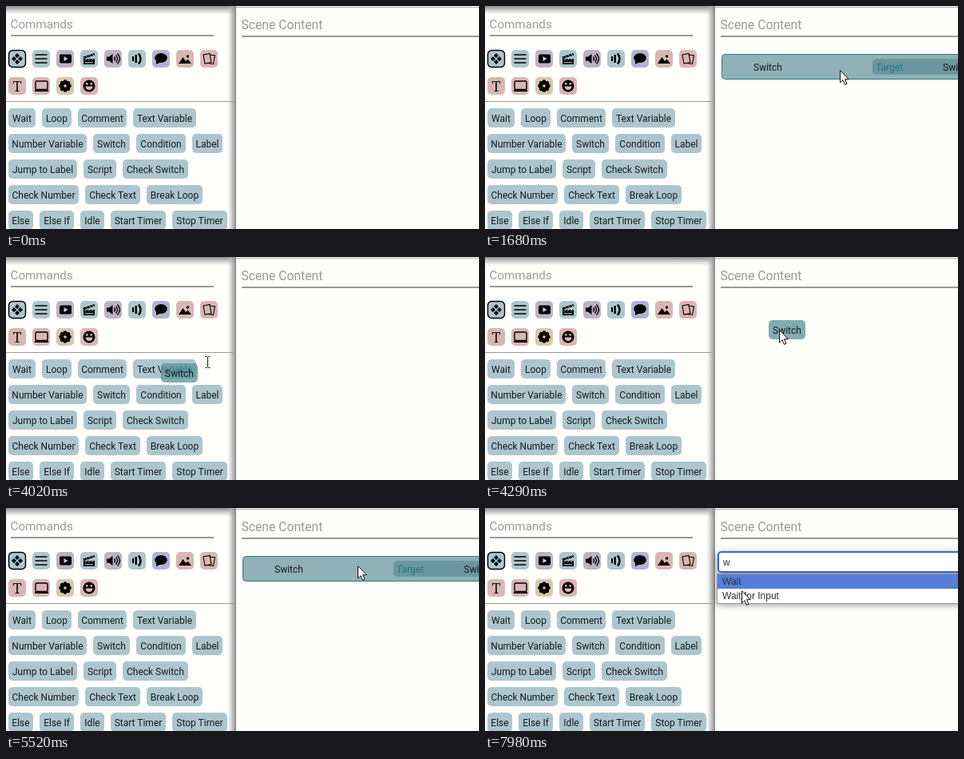
Write an HTML page that moves like this. It is 592 px wide and 279 px high and loops after 8000 ms.

```html
<!DOCTYPE html>
<html lang="en">
<head>
<meta charset="utf-8">
<style>
  html, body { margin: 0; width: 100%; height: 100%; overflow: hidden; background: #fefefa; }
  svg { display: block; width: 592px; height: 279px; }
  text { font: 12px Roboto, sans-serif; fill: #151a1c; }
  .head { fill: #999; }
  .tag { fill: #24747e; }
  .menu text { font-family: "Liberation Sans", Arial, sans-serif; fill: #333; }
  .row { fill: #adc6cd; }
  .slot { fill: #7ca5ac; }
  .hover .row { fill: #8fb1b7; stroke: #2b7a80; }
  .hover .slot { fill: #6a979f; }
  .line { fill: none; stroke: #000; stroke-width: 1.4; }
</style>
</head>
<body>
<svg viewBox="0 0 592 279">
  <defs>
    <linearGradient id="down" x2="0" y2="1">
      <stop stop-color="#8c8c8c"/><stop offset=".35" stop-color="#aaa" stop-opacity=".8"/><stop offset="1" stop-color="#ccc" stop-opacity="0"/>
    </linearGradient>
    <linearGradient id="side">
      <stop stop-color="#ccc" stop-opacity="0"/><stop offset=".6" stop-color="#aaa" stop-opacity=".75"/><stop offset="1" stop-color="#868686"/>
    </linearGradient>
    <filter id="blur" x="-20%" width="140%" y="-50%" height="200%"><feGaussianBlur stdDeviation="5"/></filter>
  </defs>

  <rect width="288" height="279" fill="#fffffc"/>
  <rect width="288" height="11" fill="url(#down)"/>
  <rect x="277" width="11" height="279" fill="url(#side)"/>
  <rect x="288" width="304" height="279" fill="#fefefa"/>
  <path d="M288 1.5H592" stroke="#aaa"/>
  <text class="head" x="5.5" y="28" style="font-size:15.2px">Commands</text>
  <text class="head" x="294.5" y="29" style="font-size:15.7px">Scene Content</text>
  <path d="M6 37H260M295 38H592" stroke="#999" stroke-width="2"/>
  <path d="M0 119.5H285" stroke="#999"/>
  <g id="icons"></g>
  <g id="buttons"></g>

  <g id="item">
    <rect class="row" x="296.5" y="60.5" width="330" height="31" rx="4"/>
    <rect class="slot" x="485" y="66" width="140" height="20" rx="5"/>
    <text x="336" y="80.5">Switch</text>
    <text class="tag" x="489" y="80.5">Target</text>
    <text x="573" y="80.5">Switch</text>
  </g>

  <g id="popup" class="menu">
    <rect x="290" y="57" width="340" height="64" fill="#000" opacity=".4" filter="url(#blur)"/>
    <rect x="292" y="55" width="330" height="25" rx="4" fill="#fff" stroke="#3c64c8" stroke-width="2"/>
    <text x="298" y="72">w</text>
    <rect id="caret" x="307" y="61" width="1" height="14"/>
    <rect x="290.5" y="82.5" width="330" height="37" fill="#fff" stroke="#999"/>
    <rect x="291" y="83" width="330" height="18" fill="#557fd9"/>
    <text x="297" y="96">Wait</text>
    <text x="297" y="114">Wait for Input</text>
  </g>

  <g id="ghost">
    <rect width="46" height="24" rx="5" fill="#5a929c" opacity=".76"/>
    <text x="23" y="16.5" text-anchor="middle">Switch</text>
  </g>
  <path id="arrow" d="M.5 .7V16L4 12.7 6.5 18.4 9 17.3 6.6 11.7H11.4Z" fill="#fff" stroke="#111"/>
  <path id="beam" d="M-3 -6.5H-1L0 -5.5 1 -6.5H3M0 -5.5V6.5M-3 7.5H-1L0 6.5 1 7.5H3" fill="none" stroke="#111"/>
</svg>
<script>
const $ = id => document.getElementById(id);
const teal = '#adc6cd', mauve = '#bdb3c3', blue = '#b1b3d3', pink = '#dab6b2', sand = '#d7c8ae';

const petals = Array.from({ length: 8 }, (_, i) =>
  `<circle cx="11" cy="5.6" r="2.4" transform="rotate(${i * 45} 11 11)"/>`).join('');
const icons = [
  [teal, '<rect x=".5" y=".5" width="21" height="21" rx="5" class="line"/><path d="M11 4l3 3-3 3-3-3zM11 12l3 3-3 3-3-3zM7 8l3 3-3 3-3-3zM15 8l3 3-3 3-3-3z"/>'],
  [teal, '<path class="line" d="M3.500 6H18.500M3.500 11H18.500M3.500 16H18.500"/>'],
  [mauve, '<rect x="4" y="5.500" width="15" height="11" rx="2"/><path d="M9.500 8v6l5-3z" fill="#d5ccda"/>'],
  [teal, '<path d="M4 11H18V18H4zM3.500 8.500L17.500 4 18.300 6.500 4.300 11z"/><path d="M7 7.500l2 2M11 6.200l2 2M15 5l2 2M6 13l2-2M10 13l2-2M14 13l2-2M6 15.500H16" stroke="#adc6cd"/>'],
  [mauve, '<path d="M3 8.500H6L10.500 5V17L6 13.500H3z"/><path class="line" d="M12.500 8.500q2 2.500 0 5M14.500 6.500q4 4.500 0 9M16.500 4.500q6 6.500 0 13"/>'],
  [teal, '<path d="M5 8H7V14H5zM8.500 6H11V16H8.500z"/><path d="M13 4.500q5 6.500 0 13" fill="none" stroke="#000" stroke-width="2.500"/>'],
  [blue, '<ellipse cx="11" cy="10" rx="7.800" ry="6"/><path d="M5 12L5 18 11 15z"/>'],
  [pink, '<path d="M3 17L8.500 9 12 14 14.500 11.500 19 17z"/><circle cx="14.500" cy="8" r="1.700"/>'],
  [pink, '<path class="line" style="stroke-width:1.100" d="M4 6L12 4.500 14 15.500 6 17zM12.500 6L18.500 7 16.500 17.500 9.500 16.500"/>'],
  [pink, '<text x="11" y="17.500" text-anchor="middle" style="font:18px Noto Serif,serif">T</text>'],
  [pink, '<rect x="4" y="5" width="15" height="10.500" rx="1.500" class="line"/><path d="M3 16H20V18H3z"/>'],
  [sand, petals + '<circle cx="11" cy="11" r="5.500"/><circle cx="11" cy="11" r="1.800" fill="#d7c8ae"/>'],
  [pink, '<circle cx="11" cy="11" r="7.500"/><path d="M6.500 11.500H15.500Q15 16 11 16T6.500 11.500" fill="#dab6b2"/><circle cx="8.300" cy="8.300" r="1.400" fill="#dab6b2"/><circle cx="13.700" cy="8.300" r="1.400" fill="#dab6b2"/>']
];
$('icons').innerHTML = icons.map(([color, art], i) =>
  `<g transform="translate(${3 + i % 9 * 30} ${i < 9 ? 55 : 89})"><rect width="22" height="22" rx="5" fill="${color}"/>${art}</g>`).join('');

const rows = [
  [['Wait', 34], ['Loop', 37], ['Comment', 61], ['Text Variable', 79]],
  [['Number Variable', 98], ['Switch', 46], ['Condition', 62], ['Label', 38]],
  [['Jump to Label', 86], ['Script', 41], ['Check Switch', 82]],
  [['Check Number', 88], ['Check Text', 69], ['Break Loop', 70]],
  [['Else', 31], ['Else If', 43], ['Idle', 30], ['Start Timer', 69], ['Stop Timer', 69]]
];
$('buttons').innerHTML = rows.map((row, r) => {
  let x = 3;
  const y = 128 + r * 32;
  return row.map(([label, w]) => {
    const button = `<rect x="${x}" y="${y}" width="${w}" height="24" rx="5" fill="${teal}"/>
      <text x="${x + w / 2}" y="${y + 16.5}" text-anchor="middle">${label}</text>`;
    x += w + 8;
    return button;
  }).join('');
}).join('');

// Pointer path: time, x, y, ease-out power for the way to this point
const path = [
  [60, 574, 58], [240, 380, 160], [390, 140, 204], [450, 101, 188], [540, 127, 169, 2],
  [1470, 127, 169], [1680, 444, 80, 1.5],
  [3150, 444, 80], [3720, 122, 172, 2],
  [3900, 122, 172], [3930, 132, 169], [3990, 207, 145], [4020, 252, 131], [4260, 368, 91, 2],
  [4440, 368, 91], [4590, 540, 58, 1.5],
  [5160, 540, 58], [5190, 556, 34], [5340, 520, 48], [5520, 440, 72, 2],
  [5910, 440, 72], [6120, 325, 106, 1.5],
  [6360, 325, 106], [6420, 321, 103], [8000, 321, 103]
];
function pointer(t) {
  const i = Math.max(1, path.findIndex(p => p[0] >= t));
  const [t0, x0, y0] = path[i - 1], [t1, x1, y1, power = 1] = path[i];
  const k = 1 - (1 - Math.max(0, (t - t0) / (t1 - t0))) ** power;
  return [Math.round(x0 + (x1 - x0) * k), Math.round(y0 + (y1 - y0) * k)];
}
const show = (id, on) => $(id).style.display = on ? '' : 'none';
const place = (id, x, y) => $(id).setAttribute('transform', `translate(${x} ${y})`);
const within = (t, from, to) => t >= from && t < to;

function draw(now) {
  const t = Math.floor(now % 8000 / 30) * 30;
  const [x, y] = pointer(t);
  const dragging = within(t, 3960, 4470);
  const beam = dragging && x < 288;
  show('item', within(t, 1110, 3150) || within(t, 4470, 5940));
  $('item').setAttribute('class', x >= 296 && y >= 60 && y < 92 ? 'hover' : '');
  show('popup', t >= 7470);
  show('caret', t < 7980);
  show('ghost', dragging);
  const [gx, gy] = pointer(t - 30);
  place('ghost', gx - 13, gy - 12);
  show('arrow', t >= 60 && !beam);
  show('beam', beam);
  place('arrow', x, y);
  place('beam', x + .5, y);
}
const start = performance.now();
function frame() {
  draw(performance.now() - start);
  requestAnimationFrame(frame);
}
frame();
</script>
</body>
</html>
```
